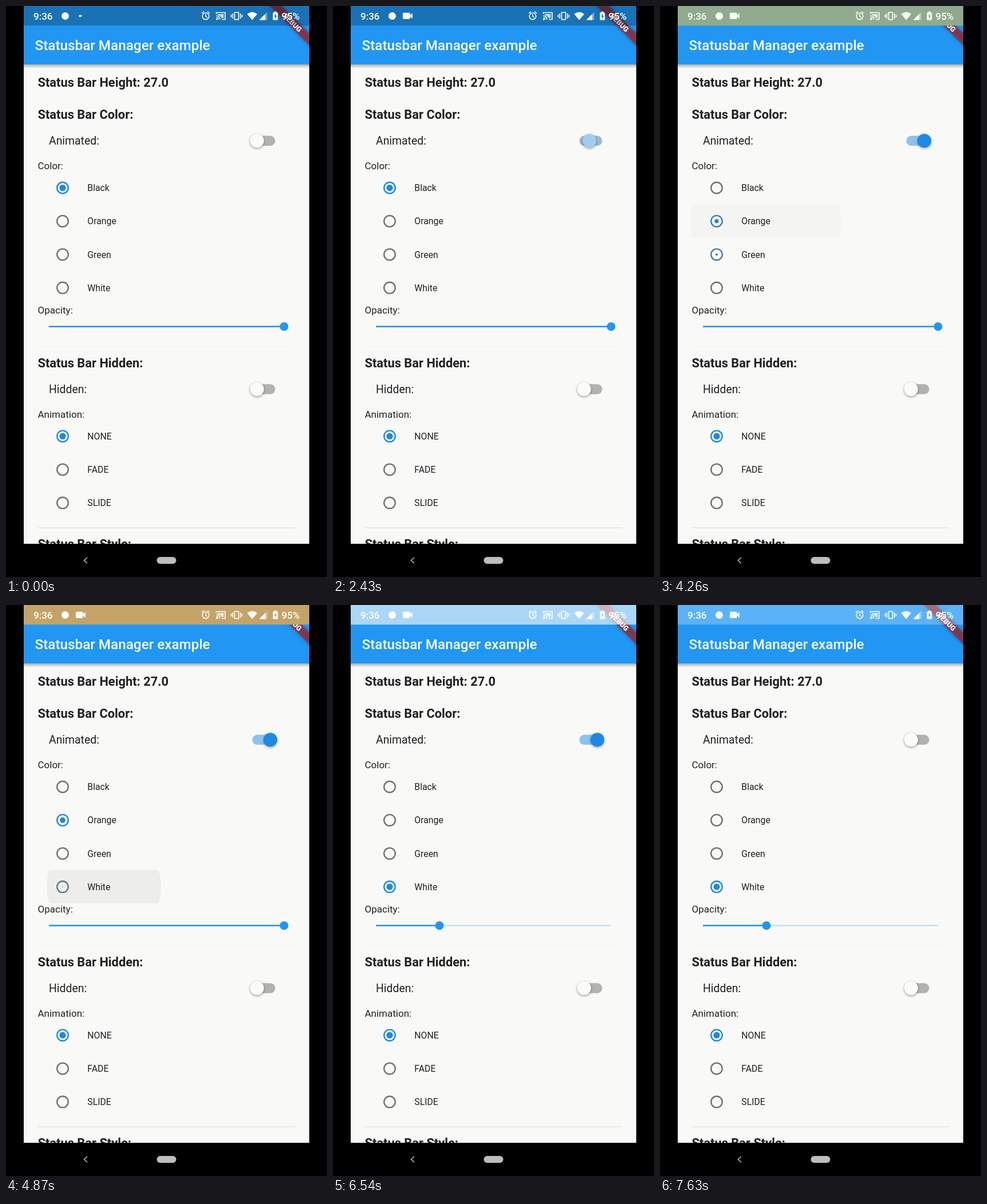
An HTML page with a canvas that plays this animation: 561 by 997 pixels, repeating every 8000 ms.

```html
<!DOCTYPE html>
<html lang="en">
<head>
<meta charset="utf-8">
<title>Status bar demo</title>
<style>
html, body { margin: 0; width: 100%; height: 100%; overflow: hidden; background: #000; }
canvas { display: block; }
</style>
</head>
<body>
<canvas id="stage" width="561" height="997"></canvas>
<script>
const ctx = document.getElementById('stage').getContext('2d');
const LOOP = 8000;
const PAGE = '#f9faf8', BLUE = '#2196f3';
const ACCENT = [30, 136, 229], GREY = [114, 115, 113];
const TRACK_OFF = [178, 179, 177], TRACK_ON = [141, 194, 238], THUMB_OFF = [251, 252, 250];

// time, red, green, blue, alpha of the status bar overlay
const BAR = [
  [0, 0, 0, 0, .25], [3300, 0, 0, 0, .25],
  [3530, 99, 176, 174, 1], [4160, 99, 176, 174, 1],
  [4380, 196, 163, 104, 1], [4900, 196, 163, 104, 1],
  [5110, 249, 251, 249, 1], [6300, 249, 251, 249, 1],
  [6540, 249, 251, 249, .64], [6740, 249, 251, 249, .27]
];
const PICKS = [[-1000, 0], [3260, 2], [4120, 1], [4870, 3]];

const clamp = v => Math.max(0, Math.min(1, v));
const lerp = (a, b, p) => a + (b - a) * p;
const rgb = c => `rgb(${c.map(Math.round)})`;
const mix = (a, b, p) => rgb(a.map((v, i) => lerp(v, b[i], p)));
// progress that jumps to `first` when the change begins
const step = (t, start, end, first) =>
  t < start ? 0 : clamp(lerp(first, 1, (t - start) / (end - start)));

function keyed(rows, t) {
  const i = rows.findIndex(r => r[0] > t);
  if (i < 0) return rows[rows.length - 1].slice(1);
  const a = rows[i - 1], b = rows[i], p = (t - a[0]) / (b[0] - a[0]);
  return a.slice(1).map((v, k) => lerp(v, b[k + 1], p));
}

function rect(x, y, w, h, color, r = 0) {
  ctx.fillStyle = color;
  ctx.beginPath();
  ctx.roundRect(x, y, w, h, r);
  ctx.fill();
}
function disc(x, y, r, color) {
  ctx.fillStyle = color;
  ctx.beginPath();
  ctx.arc(x, y, r, 0, 7);
  ctx.fill();
}
function ring(x, y, r, color, width) {
  ctx.strokeStyle = color;
  ctx.lineWidth = width;
  ctx.beginPath();
  ctx.arc(x, y, r, 0, 7);
  ctx.stroke();
}
function path(d, color, width) {
  const p = new Path2D(d);
  if (width) {
    ctx.strokeStyle = color;
    ctx.lineWidth = width;
    ctx.stroke(p);
  } else {
    ctx.fillStyle = color;
    ctx.fill(p);
  }
}
function text(s, x, y, size, weight = 400, color = '#1f201f') {
  ctx.font = `${weight} ${size}px Roboto, Arial, sans-serif`;
  ctx.fillStyle = color;
  ctx.fillText(s, x, y);
}
function shadow(blur, dy, alpha) {
  ctx.shadowBlur = blur;
  ctx.shadowOffsetY = dy;
  ctx.shadowColor = `rgba(0,0,0,${alpha})`;
}

const heading = (s, y) => text(s, 55.5, y, 21.85, 700);
const caption = (s, y) => text(s, 55.5, y, 17);

function toggle(label, y, on) {
  text(label, 75, y + 7, 19.4);
  rect(430.5, y - 8.7, 40, 17.4, mix(TRACK_OFF, TRACK_ON, on), 8.7);
  ctx.save();
  shadow(4, 1.5, .4);
  disc(lerp(438.8, 462, on), y, 12, mix(THUMB_OFF, ACCENT, on));
  ctx.restore();
}

function radio(label, y, on) {
  const color = mix(GREY, ACCENT, on);
  ring(99, y, 9.8, color, 2.4);
  if (on > 0) disc(99, y, 5.6 * on, color);
  text(label, 142.3, y + 5.6, 15.8);
}

function colorRadios(t) {
  const now = PICKS.findLastIndex(p => p[0] <= t);
  const [start, pick] = PICKS[now];
  const last = now ? PICKS[now - 1][1] : -1;
  const p = step(t, start, start + 240, .13);
  const rowY = i => 317.5 + 58.2 * i;
  if (p < 1) {
    ctx.save();
    ctx.beginPath();
    ctx.rect(55, rowY(pick) - 29, 451, 58);
    ctx.clip();
    disc(171, rowY(pick), 88 + 90 * p, `rgba(0,0,0,${.055 * (1 - p)})`);
    ctx.restore();
  }
  ['Black', 'Orange', 'Green', 'White'].forEach((s, i) =>
    radio(s, rowY(i), i === pick ? p : i === last ? 1 - p : 0));
}

function slider(t) {
  const p = clamp((t - 6180) / 260);
  const x = t < 6180 ? 486 : lerp(380, 186, 1 - (1 - p) ** 1.5);
  rect(75, 558.6, 411, 2.4, 'rgba(33,150,243,.26)');
  rect(75, 558.4, x - 75, 2.6, BLUE);
  const halo = t < 6180 ? 0 : clamp((6520 - t) / 90);
  if (halo) disc(x, 559.7, 15 * halo, 'rgba(33,150,243,.17)');
  disc(x, 559.7, 7.5, BLUE);
}

function ribbon() {
  ctx.save();
  ctx.translate(530, 0);
  ctx.rotate(Math.PI / 4);
  ctx.save();
  shadow(6, 0, .5);
  rect(-60, 34, 120, 14.6, 'rgba(183,28,28,.63)');
  ctx.restore();
  ctx.textAlign = 'center';
  text('DEBUG', 0, 45.7, 12.4, 900, '#fff');
  ctx.restore();
}

function statusIcons(t) {
  const W = '#fff';
  text('9:36', 48, 23.5, 17, 500, W);
  disc(103.5, 17.5, 6.5, W);

  // recording camera popping in
  const k = lerp(.3, 1, clamp((t - 30) / 270));
  ctx.save();
  ctx.translate(130, 17.3);
  ctx.scale(k, k);
  rect(-8, -5.5, 12.5, 11, W, 1.5);
  path('M4.5-1L8.8-5V5L4.5 1Z', W);
  ctx.restore();

  ring(349, 17.8, 5.8, W, 1.6);
  path('M349 14v4l3 2M342 13l4-3.5M356 13l-4-3.5', W, 1.5);
  path('M367.5 14v-2.5h15.5v12h-6M367.5 17q6 .5 6.5 6.5M367.5 20q3 .5 3.5 3.5', W, 1.6);
  rect(367, 22, 2.5, 2.5, W);
  path('M370 14h10.5v7h-4q-1.5-4-6.5-5Z', 'rgba(255,255,255,.75)');
  path('M399.5 11.2h7v12.4h-7ZM396.3 13v9M409.7 13v9M393.5 15v5M412.5 15v5', W, 1.6);
  path('M421.5 14q8.8-7 17.6 0L430.3 24.5Z', W);
  path('M442.5 24.5L456.5 10.5V24.5Z', 'rgba(255,255,255,.4)');
  path('M442.5 24.5L453 14V24.5Z', W);
  path('M466.5 11.5h2.2v-1.7h4.2v1.7h2.2v13h-8.6ZM471.6 13l-3.2 5.6h1.9v4l3.2-5.6h-1.9Z', W);
  text('95%', 481.5, 23.5, 17, 500, W);
}

function draw(t) {
  rect(0, 0, 561, 997, '#000');
  ctx.save();
  ctx.beginPath();
  ctx.rect(31, 0, 499, 939);
  ctx.clip();
  rect(31, 0, 499, 939, PAGE);

  heading('Status Bar Height: 27.0', 141);
  heading('Status Bar Color:', 197);
  toggle('Animated:', 235.3, step(t, 2430, 2550, .4) - step(t, 7510, 7630, .4));
  caption('Color:', 285);
  colorRadios(t);
  caption('Opacity:', 537);
  slider(t);
  rect(55, 594.5, 451, 1, '#f3f4f2');
  heading('Status Bar Hidden:', 631);
  toggle('Hidden:', 669, 0);
  caption('Animation:', 719);
  ['NONE', 'FADE', 'SLIDE'].forEach((s, i) => radio(s, 751.2 + 58.2 * i, i ? 0 : 1));
  rect(55, 910.6, 451, 1.2, '#e1e3e1');
  heading('Status Bar Style:', 947);

  const fade = ctx.createLinearGradient(0, 102, 0, 109);
  fade.addColorStop(0, 'rgba(0,0,0,.3)');
  fade.addColorStop(1, 'rgba(0,0,0,0)');
  rect(31, 102, 499, 7, fade);
  rect(31, 0, 499, 102, BLUE);
  text('Statusbar Manager example', 50.5, 77, 24.28, 500, '#fff');
  ribbon();
  const [r, g, b, a] = keyed(BAR, t);
  rect(31, 0, 499, 34.3, `rgba(${r},${g},${b},${a})`);
  statusIcons(t);
  ctx.restore();

  path('M142 963L136.5 968L142 973', '#b9b9b9', 1.6);
  rect(263.5, 962, 34, 12, '#bdbdbd', 6);
}

function frame(now) {
  draw(now % LOOP);
  requestAnimationFrame(frame);
}
draw(0);
requestAnimationFrame(frame);
</script>
</body>
</html>
```
